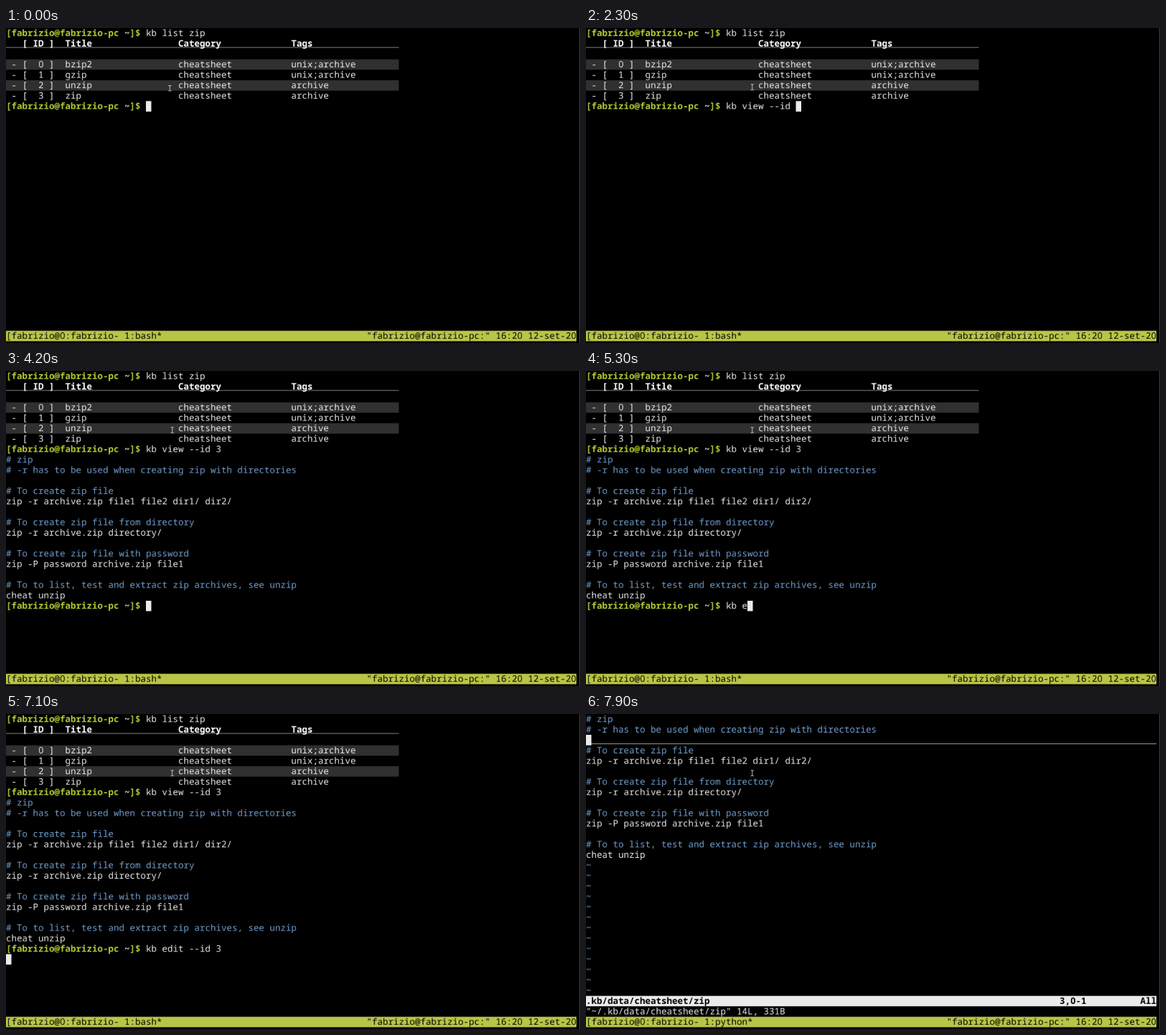
Recreate the animation shown at these times as an HTML page with a canvas. Size 800x440 px, loop 8000 ms.

```html
<!DOCTYPE html>
<html lang="en">
<head>
<meta charset="utf-8">
<title>kb terminal session</title>
<style>
html, body { margin: 0; width: 100%; height: 100%; overflow: hidden; background: #000; }
canvas { display: block; width: 800px; height: 440px; }
</style>
</head>
<body>
<canvas id="term" width="800" height="440"></canvas>
<script>
// The terminal is drawn on a 1920 x 1056 desktop, then scaled down to the stage.
const stage = document.getElementById('term').getContext('2d');
const desk = document.createElement('canvas');
desk.width = 1920;
desk.height = 1056;
const ctx = desk.getContext('2d');

const LOOP = 8000, CW = 18, CH = 35, COLS = 106, BASE = 27, SIZE = 30;
const FG = '#ebebeb', WHITE = '#fff', LIME = '#b9cb33', BAR = '#b9c546',
      BLUE = '#729fcf', STRIPE = '#303030', EDGE = '#444';
const USER = 'fabrizio', HOST = USER + '-pc';

const table = [
  ['0', 'bzip2', 'unix;archive'],
  ['1', 'gzip', 'unix;archive'],
  ['2', 'unzip', 'archive'],
  ['3', 'zip', 'archive']
];
const sheet = `# zip
# -r has to be used when creating zip with directories

# To create zip file
zip -r archive.zip file1 file2 dir1/ dir2/

# To create zip file from directory
zip -r archive.zip directory/

# To create zip file with password
zip -P password archive.zip file1

# To to list, test and extract zip archives, see unzip
cheat unzip`.split('\n');

// Time of each key press, in ms
const view = { text: 'kb view --id 3',
  keys: [900, 1000, 1100, 1200, 1300, 1400, 1500, 1600, 1700, 1900, 2000, 2100, 2300, 2800] };
const edit = { text: 'kb edit --id 3',
  keys: [5000, 5100, 5200, 5300, 5500, 5600, 5800, 5900, 6100, 6200, 6400, 6600, 6700, 6900] };
const VIEW_RUN = 3000, OUTPUT = 3300, READY = 3400, EDIT_RUN = 7100,
      EDITOR = 7400, RENAME = 7500, DOWN = [7700, 7900];

const count = (times, t) => times.filter(k => k <= t).length;
const typed = (cmd, t) => cmd.text.slice(0, count(cmd.keys, t));

function rect(x, y, w, h, color) {
  ctx.fillStyle = color;
  ctx.fillRect(x, y, w, h);
}

const fill = (row, col, cols, color) => rect(col * CW, row * CH, cols * CW, CH, color);
const underline = (row, cols) => rect(0, row * CH + 29, cols * CW, 1.5, FG);

function text(row, col, str, color = FG, bold = false) {
  const weight = bold ? 'bold ' : '';
  const mono = `${weight}${SIZE}px "Noto Sans Mono", "DejaVu Sans Mono", monospace`;
  const plain = `${weight}${SIZE}px "Open Sans", "Noto Sans", sans-serif`;
  ctx.fillStyle = color;
  [...str].forEach((ch, i) => {
    if (ch === ' ') return;
    ctx.font = ch === '0' ? plain : mono; // zero without a slash
    ctx.fillText(ch, (col + i + 0.5) * CW, row * CH + BASE);
  });
}

function cursor(row, col, under = '') {
  fill(row, col, 1, FG);
  text(row, col, under, '#000');
}

function prompt(row, cmd) {
  const head = `[${USER}@${HOST} `;
  text(row, 0, head, LIME, true);
  text(row, head.length, '~', WHITE, true);
  text(row, head.length + 1, ']$', LIME, true);
  text(row, head.length + 4, cmd);
  return head.length + 4 + cmd.length;
}

function showSheet(top) {
  sheet.forEach((s, i) => text(top + i, 0, s, s[0] === '#' ? BLUE : FG));
}

function shell(t) {
  prompt(0, 'kb list zip');
  underline(1, 73);
  text(1, 3, '[ ID ]', WHITE, true);
  text(1, 11, 'Title', WHITE, true);
  text(1, 32, 'Category', WHITE, true);
  text(1, 53, 'Tags', WHITE, true);
  table.forEach(([id, title, tags], i) => {
    const row = 3 + i;
    if (i % 2 === 0) fill(row, 0, 73, STRIPE);
    text(row, 1, `- [  ${id} ]`);
    text(row, 11, title);
    text(row, 32, 'cheatsheet');
    text(row, 53, tags);
  });

  let col = prompt(7, typed(view, t));
  if (t < VIEW_RUN) return cursor(7, col);
  if (t < OUTPUT) return cursor(8, 0);
  showSheet(8);
  if (t < READY) return cursor(22, 0);
  col = prompt(22, typed(edit, t));
  if (t < EDIT_RUN) cursor(22, col);
  else cursor(23, 0);
}

function editor(t) {
  const row = count(DOWN, t);
  showSheet(0);
  underline(row, COLS);
  cursor(row, 0, sheet[row].slice(0, 1));
  for (let r = sheet.length; r < 27; r++) text(r, 0, '~', BLUE);
  fill(27, 0, COLS, FG);
  text(27, 0, '.kb/data/cheatsheet/zip', '#000', true);
  text(27, 88, `${row + 1},${sheet[row] ? '1' : '0-1'}`, '#000', true);
  text(27, 103, 'All', '#000', true);
  text(28, 0, '"~/.kb/data/cheatsheet/zip" 14L, 331B');
}

function statusBar(t) {
  const right = `"${USER}@${HOST}:" 16:20 12-set-20`;
  fill(29, 0, COLS, BAR);
  text(29, 0, `[${USER}@0:${USER}- 1:${t < RENAME ? 'bash' : 'python'}*`, '#000');
  text(29, COLS - right.length, right, '#000');
}

function pointer(t) {
  const k = count([900, 1000, 1100], t) / 3;
  const x = 548 + 8 * k, y = 202 - 4 * k;
  ctx.strokeStyle = '#d8d8d8';
  ctx.lineWidth = 2;
  ctx.beginPath();
  for (const s of [-1, 1]) {
    ctx.moveTo(x - 5, y + s * 9);
    ctx.lineTo(x - 2, y + s * 9);
    ctx.lineTo(x, y + s * 7);
    ctx.lineTo(x + 2, y + s * 9);
    ctx.lineTo(x + 5, y + s * 9);
  }
  ctx.moveTo(x, y - 7);
  ctx.lineTo(x, y + 7);
  ctx.stroke();
}

function draw(t) {
  rect(0, 0, desk.width, desk.height, '#000');
  rect(desk.width - 2, 0, 2, desk.height, EDGE);
  ctx.textAlign = 'center';
  ctx.textBaseline = 'alphabetic';
  ctx.textRendering = 'geometricPrecision';
  if (t < EDITOR) shell(t);
  else editor(t);
  statusBar(t);
  pointer(t);
  stage.imageSmoothingQuality = 'high';
  stage.drawImage(desk, 0, 0, 800, 440);
}

const start = performance.now();
function tick() {
  draw((performance.now() - start) % LOOP);
  requestAnimationFrame(tick);
}
tick();
</script>
</body>
</html>
```
